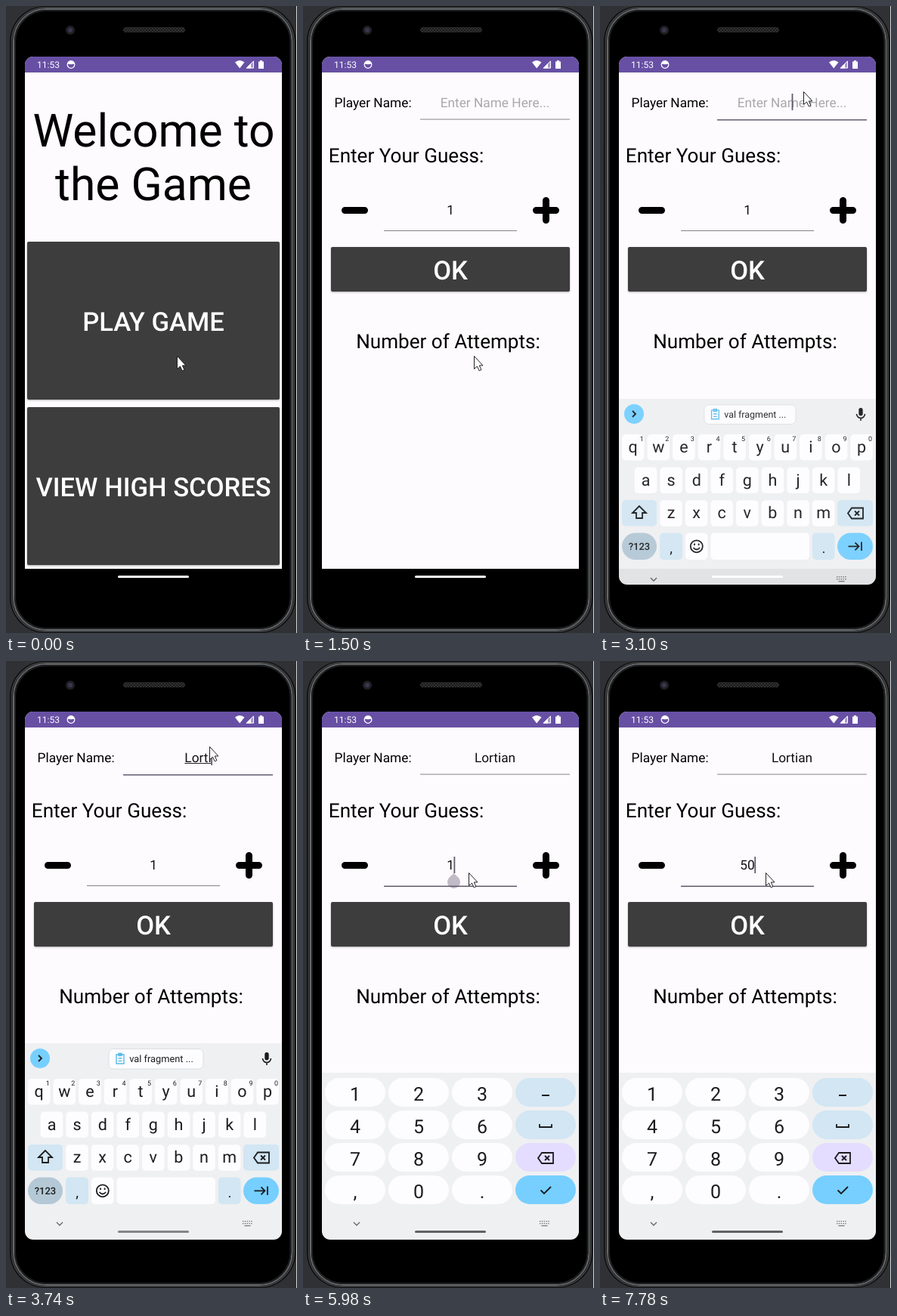
These frames come from a looping animation (385x830 px, 8000 ms). An HTML page:

```html
<!DOCTYPE html>
<html lang="en">
<head>
<meta charset="utf-8">
<title>Guessing game</title>
<style>
html, body { margin: 0; width: 100%; height: 100%; overflow: hidden; background: #303134; }
svg { display: block; width: 100%; height: 100%; font-family: Roboto, sans-serif; text-rendering: geometricPrecision; }
.mid { text-anchor: middle; }
.btn { font-size: 34.6px; font-weight: 500; fill: #fff; text-anchor: middle; }
.big { font-size: 60.6px; text-anchor: middle; }
.h { font-size: 26.1px; }
.p { font-size: 17.3px; }
.line { fill: none; stroke: #1b1c1e; stroke-width: 1.8; }
</style>
</head>
<body>
<svg viewBox="0 0 385 830" xmlns="http://www.w3.org/2000/svg">
  <defs>
    <clipPath id="screen"><rect x="25" y="67" width="340" height="699" rx="11"/></clipPath>
    <clipPath id="playClip"><rect x="28" y="312" width="334" height="209" rx="2"/></clipPath>
    <pattern id="mesh" width="4" height="4" patternUnits="userSpaceOnUse">
      <path d="M0 4L4 0M0 0L4 4" stroke="#363636" stroke-width=".8"/>
    </pattern>
    <filter id="shade" x="-5%" y="-5%" width="110%" height="115%">
      <feDropShadow dx="0" dy="1" stdDeviation="1" flood-opacity=".3"/>
    </filter>
  </defs>

  <!-- phone -->
  <rect width="385" height="830" fill="#303134"/>
  <rect x="384" width="1" height="830" fill="#d4d4d4"/>
  <rect x="5" y="0" width="378.5" height="830" rx="47" fill="#0b0b0c"/>
  <rect x="7.5" y="2" width="373.500" height="826" rx="45" fill="none" stroke="#3a3b3d" stroke-width="2"/>
  <rect x="10" y="4" width="368.500" height="822" rx="43" stroke="#66686a" stroke-width="2"/>
  <rect x="12" y="6" width="364.500" height="818" rx="41" stroke="#1f2022" stroke-width="2"/>
  <circle cx="85" cy="32" r="6" fill="#202024"/>
  <circle cx="85" cy="32" r="3" fill="#39364f"/>
  <rect x="155" y="28" width="82" height="7" rx="3.500" fill="#1b1b1b"/>
  <rect x="155" y="28" width="82" height="7" rx="3.500" fill="url(#mesh)"/>

  <g clip-path="url(#screen)">
    <rect x="25" y="67" width="340" height="678" fill="#fefbfe"/>
    <rect x="25" y="67" width="340" height="21" fill="#6750a4"/>
    <g fill="#fff">
      <text x="41" y="82" font-size="12">11:53</text>
      <circle cx="86" cy="77.500" r="4.800" fill="none" stroke="#fff" stroke-width="1.300"/>
      <path d="M81.500 76.500Q86 78 90.500 76.500Q90 72.500 86 72.500Q82 72.500 81.500 76.500"/>
      <path d="M303 74.500Q309 69.500 315.500 74.500L309.200 82.500Z"/>
      <path d="M328 72V82.500H317.500Z" opacity=".4"/>
      <path d="M327.500 73V82H318.500Z" fill="none" stroke="#fff"/>
      <path d="M324 76V82.500H317.500Z"/>
      <path d="M334 73.500h2v-1.500h3v1.500h2v9.500h-7z"/>
    </g>

    <g id="home">
      <text class="big" x="195.500" y="186">Welcome to</text>
      <text class="big" x="195" y="257">the Game</text>
      <g fill="#3c3c3c" filter="url(#shade)">
        <rect x="28" y="312" width="334" height="209" rx="2"/>
        <rect x="28" y="531" width="334" height="209" rx="2"/>
      </g>
      <g clip-path="url(#playClip)"><circle id="ripple" fill="#fff" opacity=".12"/></g>
      <text class="btn" x="195" y="430">PLAY GAME</text>
      <text class="btn" x="195" y="649">VIEW HIGH SCORES</text>
    </g>

    <g id="game">
      <text class="p" x="41.600" y="133.500">Player Name:</text>
      <text class="h" x="33.800" y="207">Enter Your Guess:</text>
      <text class="h mid" x="192" y="453">Number of Attempts:</text>
      <g stroke="#000" stroke-width="9" stroke-linecap="round">
        <path d="M55.500 270.500H81.500M308.500 270.500H334.500M321.500 257.500V283.500"/>
      </g>
      <rect x="37" y="319" width="316" height="59" rx="2" fill="#3c3c3c" filter="url(#shade)"/>
      <text class="btn" x="195" y="362">OK</text>
      <rect id="nameLine" x="155" width="198"/>
      <rect id="numLine" x="107" width="176"/>
      <text id="name" class="p mid" x="254" y="133.500"></text>
      <rect id="compose" y="135" height="1" fill="#222"/>
      <text id="num" class="p mid" x="195" y="276"></text>
      <path id="drop" d="M199.500 281L205.500 286.500A8.500 8.500 0 1 1 193.500 286.500Z" fill="#625b71"/>
      <rect id="caret" width="1.800" height="22" fill="#625b71"/>
    </g>

    <g id="letters"></g>
    <g id="digits"></g>
  </g>
  <rect id="pill" x="148" y="754" width="94" height="3" rx="1.500"/>
  <path id="mouse" d="M.5 .5V17.500L4.500 14L7.200 19.800L9.900 18.600L7.300 12.900H12Z" fill="#fff" stroke="#222"/>
</svg>

<script>
const $ = id => document.getElementById(id);
const set = (id, attrs) => { for (const k in attrs) $(id).setAttribute(k, attrs[k]); };
const show = (id, on) => set(id, { visibility: on ? 'visible' : 'hidden' });

const WHITE = '#fdfcff', PALE = '#d2e6f3', BLUE = '#76cfff', INK = '#1b1c1e';
const rect = (x, y, w, h, r, fill, more = '') =>
  `<rect x="${x}" y="${y}" width="${w}" height="${h}" rx="${r}" fill="${fill}" ${more}/>`;
const text = (x, y, size, s, more = '') =>
  `<text class="mid" x="${x}" y="${y}" font-size="${size}" fill="${INK}" ${more}>${s}</text>`;
const line = (d, more = '') => `<path class="line" d="${d}" ${more}/>`;
const erase = (x, y) =>
  line(`M${x - 10} ${y}l5 -7h15v14h-15zM${x - 1} ${y - 3}l6 6m0 -6l-6 6`);

function base(top) {
  let s = rect(25, top, 340, 766 - top, 0, '#eff0f2') + line('M67 743l4 4l4 -4', 'style="stroke:#666;stroke-width:1.300"');
  for (let i = 0; i < 10; i++)
    s += rect(313 + i % 5 * 2.800, 741 + (i > 4 ? 3 : 0), 1.400, 1.400, 0, '#777');
  return s + rect(315.500, 747, 8, 1.200, 0, '#777');
}

function letterBoard() {
  let s = base(506)
    + `<circle cx="45" cy="526" r="13" fill="${BLUE}"/>` + line('M43 522l4 4l-4 4')
    + '<g id="chip">'
    + rect(136, 513.500, 125, 26.500, 6, WHITE, 'stroke="#dcdee1"')
    + line('M146 521h10v12h-10zM149 519.500h4v3h-4zM148.500 526h5M148.500 529.500h5', 'style="stroke:#58bce8;stroke-width:1.400"')
    + text(205.500, 531, 12.800, 'val fragment ...')
    + '</g>'
    + rect(342.300, 518, 5.400, 10.500, 2.700, INK)
    + line('M339.500 526a5.500 5.500 0 0 0 11 0M345 531.500v3.500', 'style="stroke-width:1.600"');
  ['qwertyuiop', 'asdfghjkl', 'zxcvbnm'].forEach((row, r) => {
    [...row].forEach((c, i) => {
      const x = [43.700, 60.500, 94][r] + i * 33.600, y = 553 + r * 43.600;
      s += rect(x - 14.800, y, 29.600, 34.500, 5, WHITE)
        + text(x, y + 24, 21.500, c, 'data-key="1"');
      if (!r) s += text(x + 11.500, 562, 9, (i + 1) % 10);
    });
  });
  return s
    + rect(29, 640, 46, 34.500, 5, PALE)
    + line('M52 648l-9 9h5v7h8v-7h5z')
    + rect(314, 640, 47, 34.500, 5, PALE) + erase(338, 657.500)
    + rect(29, 683.500, 46, 35.500, 17.700, '#b4c8d5') + text(52, 706, 13, '?123', 'font-weight="500"')
    + rect(79, 683.500, 30, 35.500, 5, PALE) + text(94, 710, 19, ',')
    + rect(113, 683.500, 29.500, 35.500, 5, WHITE)
    + line('M119.800 701.300a8 8 0 1 0 16 0a8 8 0 1 0 -16 0M123.500 703q4.300 5 8.600 0M125 697.500v2.500M130.600 697.500v2.500')
    + rect(146.500, 683.500, 130.500, 35.500, 5, WHITE)
    + rect(281, 683.500, 29.500, 35.500, 5, PALE) + text(296, 710, 19, '.')
    + rect(314, 683.500, 47, 35.500, 17.700, BLUE)
    + line('M328.500 701.300h14m-5 -5l5 5l-5 5M346 695.500v11.500');
}

function digitBoard() {
  const tint = [PALE, PALE, '#e4ddff', BLUE];
  let s = base(545);
  ['123', '456', '789', ',0.'].forEach((row, r) => {
    const y = 552 + r * 43;
    for (let c = 0; c < 4; c++) {
      s += rect(29 + c * 84, y, 80, 38, 19, c < 3 ? WHITE : tint[r]);
      if (c < 3) s += text(69 + c * 84, y + 29.500, 25, row[c]);
    }
  });
  return s + line('M316 575h10M313 613v4h16v-4') + erase(321, 658) + line('M314.500 700.500l4.500 4.500l9 -9');
}

$('letters').innerHTML = letterBoard();
$('digits').innerHTML = digitBoard();
const keys = document.querySelectorAll('[data-key]');

// Each row: start time, then the values that hold until the next row.
const mousePath = [[0, 226, 463], [2000, 241, 385], [2120, 281, 205], [2240, 304, 76], [2360, 269, 113],
  [4460, 240, 134], [4580, 201, 160], [4730, 180, 182], [5260, 214, 282], [5380, 219, 280]];
const ripples = [[0, 226, 463, 0], [1110, 223, 459, 48], [1230, 218, 454, 92]];
const slide = [[0, 260, 0], [2740, 242, .03], [2860, 190, .15], [2980, 85, .6], [3100, 14, .95], [3220, 0, 1]];
const typed = [[0, 0], [3490, 1], [3610, 3], [3740, 5], [3860, 6], [3980, 7]];
const guess = [[0, '1'], [6980, ''], [7660, '5'], [7780, '50']];
const carets = [[0, 0], [2620, 1], [4730, 0], [5260, 1], [6410, 0], [6980, 1], [7380, 0], [7660, 1]];
const drops = [[0, 0], [5860, .2], [5980, .4], [6100, 1], [6980, 0]];
const pills = [[0, '#fff'], [3370, '#d0d0d0'], [3490, '#b8b8b8'], [3610, '#a0a0a0'], [3740, '#858585'],
  [3860, '#757575'], [3980, '#6b6b6b'], [4220, '#626262']];
const at = (rows, t) => rows.filter(r => r[0] <= t).pop().slice(1);

function field(id, value, hint) {
  $(id).textContent = value || hint;
  set(id, { fill: value ? '#111' : '#a9a8ab' });
  return value ? $(id).getComputedTextLength() : 0;
}
const underline = (id, y, focus) =>
  set(id, { y: focus ? y + .5 : y, height: focus ? 1.500 : 1, fill: focus ? '#625b71' : '#858387' });

function draw(t) {
  const playing = t >= 1500, onNum = t >= 5500, onName = t >= 2620 && !onNum, pad = t >= 5620;
  show('home', !playing);
  show('game', playing);
  const [rx, ry, r] = at(ripples, t);
  set('ripple', { cx: rx, cy: ry, r });

  const nameW = field('name', 'Lortian'.slice(0, at(typed, t)[0]), 'Enter Name Here...');
  const numW = field('num', at(guess, t)[0], 'Enter Guess Here...');
  underline('nameLine', 149.500, onName);
  underline('numLine', 297, onNum);
  set('compose', { x: 254 - nameW / 2, width: onName ? nameW : 0 });
  set('caret', {
    x: onNum ? 194.600 + numW / 2 : 253.600 + nameW / 2,
    y: onNum ? 259 : 116,
    opacity: at(carets, t)[0]
  });
  set('drop', { opacity: at(drops, t)[0] });

  const [dy, alpha] = at(slide, t);
  set('letters', { transform: `translate(0 ${dy})`, opacity: alpha });
  set('chip', { transform: `translate(198 526) scale(${.4 + .6 * alpha}) translate(-198 -526)`, opacity: alpha });
  show('letters', !pad);
  show('digits', pad);
  const caps = t >= 3370 && t < 3490;
  keys.forEach(k => k.textContent = caps ? k.textContent.toUpperCase() : k.textContent.toLowerCase());

  set('pill', { fill: at(pills, t)[0] });
  set('mouse', { transform: `translate(${at(mousePath, t)})` });
}

const start = performance.now();
function tick() {
  draw((performance.now() - start) % 8000);
  requestAnimationFrame(tick);
}
tick();
</script>
</body>
</html>
```
